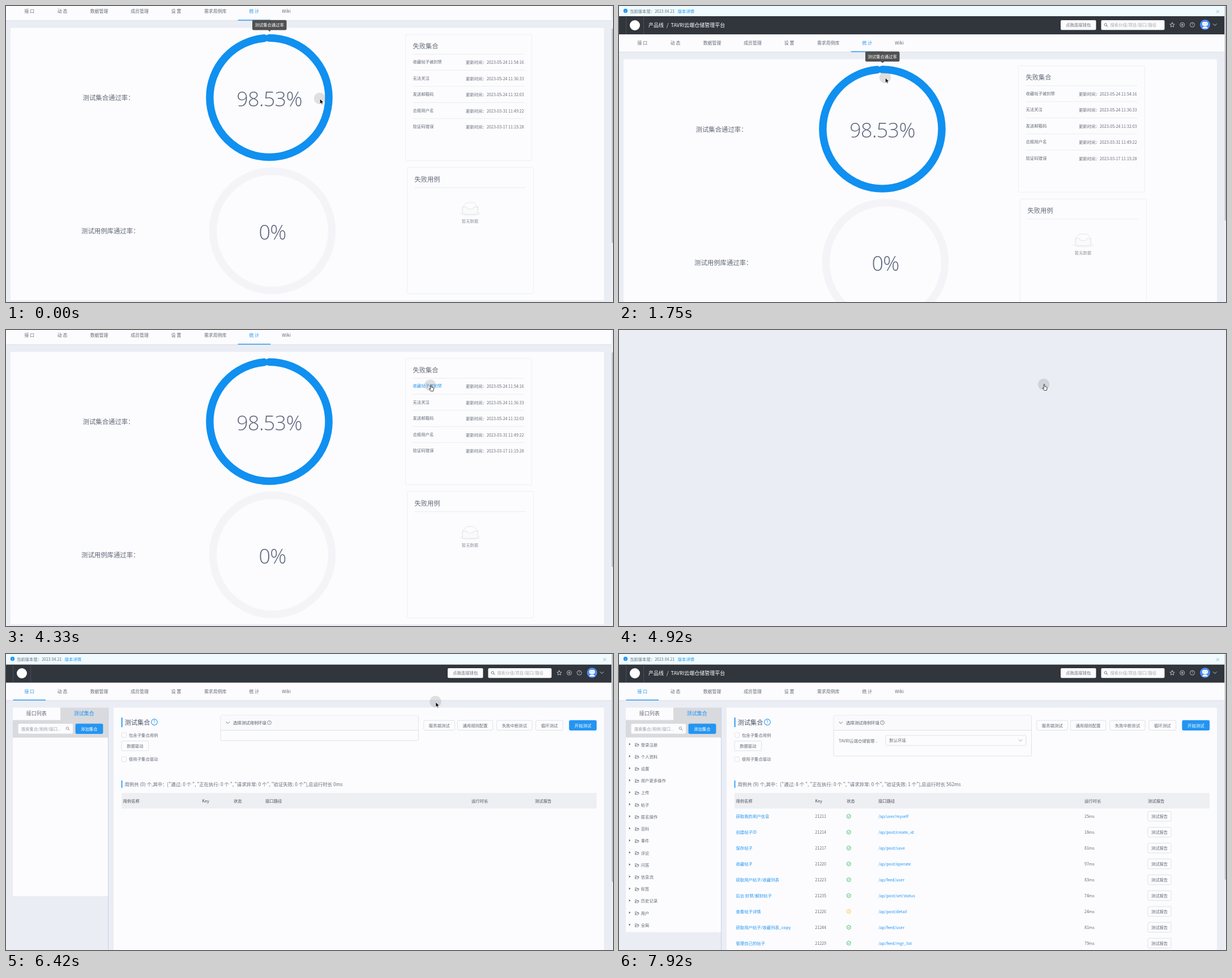
Write an HTML page that moves like this. It is 1072x522 px and loops after 9.16 s.

```html
<!DOCTYPE html>
<html lang="zh-CN">
<head>
<meta charset="utf-8">
<title>测试平台</title>
<style>
html, body { margin: 0; width: 100%; height: 100%; overflow: hidden; background: #ebedf5; }
svg { display: block; width: 1072px; height: 522px; }
text { font-family: "Noto Sans CJK SC", "Noto Sans CJK", "Noto Sans", sans-serif; white-space: pre; }
.big { font-family: "Open Sans", "Noto Sans", sans-serif; font-weight: 300; letter-spacing: -.7px; }
</style>
</head>
<body>
<svg id="stage" viewBox="0 0 1072 522" xmlns="http://www.w3.org/2000/svg"></svg>
<script>
const BLUE = '#2395f1', INK = '#646a79', PANEL = '#fcfcfe', PAGE = '#ebedf5', LINE = '#e3e5ec';
const LOOP = 9160, STEP = 1000 / 12, SCROLL = 55.5;
const PROJECT = 'TAVRI云端仓储管理平台';

// y is the vertical middle of the line
const text = (x, y, s, size = 7.35, fill = INK, anchor = 'start', more = '') =>
  `<text x="${x}" y="${(y + size * .37).toFixed(2)}" font-size="${size}" fill="${fill}" text-anchor="${anchor}" ${more}>${s}</text>`;
const mid = (x, y, s, size, fill, more) => text(x, y, s, size, fill, 'middle', more);
const rect = (x, y, x2, y2, fill, more = '') =>
  `<rect x="${x}" y="${y}" width="${x2 - x}" height="${y2 - y}" fill="${fill}" ${more}/>`;
const box = (x, y, x2, y2, fill = PANEL, stroke = '#d9dbe3') =>
  rect(x, y, x2, y2, fill, `rx="2" stroke="${stroke}" stroke-width=".8"`);
const path = (d, stroke, w = .8, fill = 'none') =>
  `<path d="${d}" fill="${fill}" stroke="${stroke}" stroke-width="${w}" stroke-linejoin="round" stroke-linecap="round"/>`;
const circle = (x, y, r, fill, more = '') => `<circle cx="${x}" cy="${y}" r="${r}" fill="${fill}" ${more}/>`;
const hline = (x, x2, y) => path(`M${x} ${y}H${x2}`, '#e6e8ee', .8);
const group = (id, body) => `<g id="${id}">${body}</g>`;
const button = (x, x2, y, s, primary) =>
  box(x, y, x2, y + 17.3, primary ? BLUE : PANEL, primary ? BLUE : undefined) +
  mid((x + x2) / 2, y + 8.7, s, 7.35, primary ? '#fff' : INK);
const chevron = (x, y, c) => path(`M${x - 3} ${y - 1.5}l3 3 3 -3`, c, .9);
const lens = (x, y, c) => circle(x - .6, y - .6, 2.2, 'none', `stroke="${c}" stroke-width=".8"`) + path(`M${x + 1} ${y + 1}l2 2`, c, .9);
const help = (x, y, r, c) => circle(x, y, r, 'none', `stroke="${c}" stroke-width="${r * .2}"`) + mid(x, y, '?', r * 1.5, c);

function star(x, y) {
  let d = '';
  for (let i = 0; i < 10; i++) {
    const a = i * Math.PI / 5, r = i % 2 ? 2 : 4.4;
    d += (i ? 'L' : 'M') + (x + r * Math.sin(a)).toFixed(2) + ' ' + (y - r * Math.cos(a)).toFixed(2);
  }
  return path(d + 'Z', '#d8dade', .8);
}

function header(dy, active, crumbId) {
  const tabs = [['接 口', 41.3], ['动 态', 99.5], ['数据管理', 164.5], ['成员管理', 236], ['设 置', 300.5],
    ['需求用例库', 369.7], ['统 计', 438.3], ['Wiki', 495]];
  const cx = tabs[active][1], top = 18 + dy, y = 34, icon = '#d8dade';
  return rect(0, 0, 1069.5, top, '#effbff') +
    circle(11.5, 8.5, 3.7, BLUE) + mid(11.5, 8.5, 'i', 5.5, '#fff') +
    text(19, 9, '当前版本是：') + text(63.2, 9, '2023.04.21', 7) + text(103.7, 9, '版本详情', 7.35, BLUE) +
    path('M1055.2 7.6l4.4 4.4m0 -4.4l-4.4 4.4', '#8d939c', .7) +
    rect(0, top, 1069.5, 50 + dy, '#31353c') +
    path(`M12.5 ${top}V${50 + dy}M43.5 ${top}V${50 + dy}`, '#50555c', .8) +
    circle(28, y, 9, '#fff') +
    group(crumbId, text(52, y, '产品线', 9, '#fff') + text(84, y, '/', 9, '#fff') + text(91.5, y, PROJECT, 9, '#fff')) +
    rect(780, 25, 842.5, 42.3, '#fcfcfe', 'rx="2"') + mid(811.2, 33.7, '点我连接钱包') +
    rect(851.5, 25, 963.5, 42.3, '#fcfcfe', 'rx="2"') + lens(860, 33.5, '#555b66') +
    text(867.5, 33.7, '搜索分组/项目/接口/路径', 7.3, '#a3a7b1') +
    star(977, 33.5) +
    circle(994.7, 33.2, 4, 'none', `stroke="${icon}" stroke-width=".8"`) + path('M992.7 33.2h4m-2 -2v4', icon, .8) +
    help(1012.5, 33.2, 4, icon) +
    circle(1035, 33, 9, '#4c8df5') + rect(1030, 28, 1040, 35, '#fff', 'rx="3.3"') +
    circle(1033, 31.5, .8, '#4c8df5') + circle(1037, 31.5, .8, '#4c8df5') +
    path('M1030.5 39.5a4.5 3.6 0 0 1 9 0z', '#fff', .3, '#fff') +
    chevron(1052.3, 33, icon) +
    rect(0, 80.5 + dy, 1069.5, 82 + dy, '#e0e2ea') + rect(0, 50 + dy, 1069.5, 80.7 + dy, PANEL) +
    tabs.map(([s, x], i) => mid(x, 65 + dy, s, 7.9, i == active ? BLUE : INK)).join('') +
    rect(cx - 28.8, 79.8 + dy, cx + 28.8, 81.2 + dy, BLUE);
}

function ring(x, y, share) {
  const r = 105.1, all = 2 * Math.PI * r;
  const arc = share ? circle(x, y, r, 'none', `stroke="#1090f0" stroke-width="13.4" stroke-linecap="round"
    stroke-dasharray="${all * share} ${all}" transform="rotate(-90 ${x} ${y})"`) : '';
  return circle(x, y, r, 'none', 'stroke="#f4f4f8" stroke-width="13.4"') + arc +
    mid(x, y + 2, share ? '98.53%' : '0%', 36, '#616a80', 'class="big"');
}

function statsPage() {
  const failed = [['收藏帖子被封禁', '05-24 11:54:16'], ['无法关注', '05-24 11:36:33'], ['发送邮箱码', '05-24 11:32:03'],
    ['合规用户名', '03-31 11:49:22'], ['验证码错误', '03-17 11:15:28']];
  const rows = failed.map(([s, d], i) => {
    const y = 154 + i * 28.5;
    return text(718.5, y, s, 7.35, INK, 'start', i ? '' : 'id="link"') + text(812, y + 1, '更新时间：') +
      text(914.7, y + 1, '2023-' + d, 7.1, INK, 'end') + (i < 4 ? hline(719, 915, y + 14.7) : '');
  }).join('');
  const empty = `<g transform="translate(801 402.3) scale(.587)" fill="none" stroke="#d9dbe0" stroke-width="1.2">
    <ellipse cx="32" cy="33" rx="32" ry="7" fill="#f5f5f8" stroke="none"/>
    <path d="M55 12.8L44.9 1.3Q44 0 42.9 0H21.1Q20 0 19.1 1.3L9 12.8V22H55Z"/>
    <path fill="#fafafc" d="M41.6 15.9Q42 13 43.8 13H55V31Q55 35 52 35H12Q9 35 9 31V13H20.2Q22 13 22.4 16T24.6 18.9H39.4Q41.3 18.9 41.6 15.9Z"/></g>`;
  return rect(0, 0, 1072, 600, PAGE) + header(0, 6, 'crumbA') +
    rect(8, 94, 1056, 574.5, PANEL) +
    text(135.5, 217.3, '测试集合通过率：', 11.4) + text(133, 452.3, '测试用例库通过率：', 11.4) +
    ring(465, 217, .9853) + ring(470.5, 452, 0) +
    box(705.5, 105.5, 928.5, 328.3, PANEL, '#e9ebf3') + text(718.5, 126, '失败集合', 11.25) + hline(719, 915, 140.6) + rows +
    box(708.5, 340.3, 931.5, 563, PANEL, '#e9ebf3') + text(721.5, 361, '失败用例', 11.25) + hline(722, 917, 375.8) +
    empty + mid(819.5, 435.2, '暂无数据', 7.35, '#8f94a0') +
    group('tip', rect(435, 80.2, 495.5, 98, '#505050', 'rx="2.2"') + path('M462.4 98l3 2.6 3 -2.6z', 'none', 0, '#505050') +
      mid(465.2, 89.2, '测试集合通过率', 7.35, '#fff'));
}

const summary = (n, ok, bad, ms) => text(209.5, 229.7,
  `用例共 (${n}) 个,其中：["通过: ${ok} 个 ", "正在执行: 0 个 ", "请求异常: 0 个", "验证失败: ${bad} 个"],总运行时长 ${ms}ms`, 8.38);

function casePage() {
  const folders = ['登录注册', '个人资料', '设置', '用户更多操作', '上传', '帖子', '匿名操作', '百科', '事件', '评论', '问答',
    '信息流', '标签', '历史记录', '用户', '全局'];
  const tree = folders.map((s, i) => {
    const y = 159.8 + i * 21.22;
    return path(`M17.8 ${y - 2.8}l2.4 2 -2.4 2z`, 'none', 0, '#4d5360') +
      path(`M28.8 ${y + 2.6}v-5h2.4l1 1.2h2v1.3m-5.4 2.5l1.3 -2.5h5.2l-1.3 2.5z`, '#5d6373', .7) + text(38.7, y, s);
  }).join('');
  const cases = [['获取我的用户信息', 21211, 'user/myself', 25], ['创建帖子ID', 21214, 'post/create_id', 18],
    ['保存帖子', 21217, 'post/save', 81], ['收藏帖子', 21220, 'post/operate', 97], ['获取用户帖子/收藏列表', 21223, 'feed/user', 83],
    ['后台 封禁/解封帖子', 21235, 'post/set/status', 74], ['查看帖子详情', 21226, 'post/detail', 24],
    ['获取用户帖子/收藏列表_copy', 21244, 'feed/user', 81], ['管理自己的帖子', 21229, 'feed/mgr_list', 79]];
  const rows = cases.map(([s, key, url, ms], i) => {
    const y = 286.6 + i * 27.95, warn = i == 6, c = warn ? '#f5c02c' : '#2fbf62';
    return text(206.5, y, s, 7.35, BLUE) + text(346.3, y, key, 7.1) +
      circle(405.8, y - .3, 3.5, 'none', `stroke="${c}" stroke-width=".9"`) +
      path(warn ? `M405.8 ${y - 1.8}v1.8m0 1.2v.1` : `M404.2 ${y - .3}l1.2 1.2 2.1 -2.3`, c, .9) +
      text(458.2, y, '/ap/' + url, 7.2, BLUE) + text(822, y, ms + 'ms', 7.1) + button(934, 975, y - 9, '测试报告');
  }).join('');
  const heads = [['用例名称', 206.5], ['Key', 346.3], ['状态', 402], ['接口路径', 458], ['运行时长', 822], ['测试报告', 934]];
  const check = (y, s) => box(204.2, y - 4.3, 212.6, y + 4.1) + text(217, y, s);
  return rect(0, 0, 1072, 522, PAGE) + header(.7, 0, 'crumbB') +
    rect(12, 94.5, 180, 427, PANEL) + path('M180.6 94.5V522', '#c8d0ea', 1) +
    rect(96, 94.5, 180, 117, '#d9dade') + rect(12, 116.5, 180, 147.5, '#d9dade') +
    mid(53.7, 105, '接口列表', 9) + mid(137.7, 105, '测试集合', 9, BLUE) +
    rect(21.5, 123, 118, 140.5, PANEL, 'rx="2"') + text(27, 132, '搜索集合/用例/接口...', 7.3, '#9a9eaa') + lens(109, 131.5, '#7b808c') +
    button(123, 171, 123.2, '添加集合', true) +
    group('tree', rect(12, 147.5, 180, 490.5, PANEL) + tree) +
    rect(190, 94.5, 1056, 522, PANEL) +
    rect(203.7, 112, 205.6, 129, BLUE) + text(209.5, 120.5, '测试集合', 11.25, '#4f5667') + help(262, 120.2, 5.3, BLUE) +
    check(143, '包含子集合用例') + button(204, 251.7, 153.4, '数据驱动') + check(185.7, '使用子集合驱动') +
    group('envShort', box(379, 108, 728.5, 152.7)) +
    group('envFull', box(379, 108, 728.5, 180) + text(388, 152.8, PROJECT.slice(0, 11) + '...', 7.3) +
      box(470.8, 143.7, 719, 161.3) + text(477.2, 152.6, '默认环境') + chevron(709, 152.5, '#a4a8b2')) +
    rect(379.4, 108.4, 728.1, 134.3, '#fafafc') + path('M379 134.5H728.5', '#d9dbe3') +
    chevron(391.7, 121.2, '#5d6373') + text(401, 121.3, '选择测试用例环境', 7.35, '#4f5667') + help(465, 121, 3.5, '#5d6373') +
    button(737.8, 792.5, 117.1, '服务端测试') + button(797.3, 859.7, 117.1, '通用规则配置') +
    button(866.7, 929.2, 117.1, '失败中断测试') + button(935.7, 983.7, 117.1, '循环测试') + button(994.8, 1042.8, 117.1, '开始测试', true) +
    rect(203.7, 223, 205.4, 236, BLUE) +
    group('sumEmpty', summary(0, 0, 0, 0)) + group('sumFull', summary(9, 8, 1, 562)) +
    rect(204, 245, 1043, 272.5, '#eeeff2') +
    heads.map(([s, x]) => text(x, 259, s, 7.35, '#4b515f', 'start', 'font-weight="500"')).join('') +
    group('rows', rows);
}

function loader() {
  let dots = '';
  for (let i = 0; i < 8; i++) {
    const a = i * Math.PI / 4;
    dots += circle(541.3 + 14 * Math.sin(a), 266.4 - 14 * Math.cos(a), 3, BLUE, 'class="dot"');
  }
  return rect(0, 0, 1072, 522, '#fbfdff') + dots;
}

const pointer = circle(0, 0, 10.2, '#888', 'opacity=".25"') +
  group('arrow', path('M.6 1.2V9.3L2.5 7.6 3.9 10.6 5.2 10 3.9 7.1H6.4Z', '#fff', .5, '#000')) +
  group('hand', path('M.2 0Q1 -1 1.8 0V3.6L5.4 4.5Q6.3 4.9 6.1 6L5.2 10.5H.9L-1.9 6.8Q-2 5.5 -.8 5.9L.2 7Z', '#333', .9, '#fff'));

document.getElementById('stage').innerHTML =
  group('stats', statsPage()) + group('blank', rect(0, 0, 1072, 522, PAGE)) + group('load', loader()) +
  group('cases', casePage()) +
  group('bar', rect(1069.5, 0, 1072, 522, '#eff0f4') + rect(1069.8, 0, 1072, 378, '#bfc1c7', 'id="thumb" rx="1"')) +
  group('pointer', pointer);

const $ = id => document.getElementById(id);
const show = (id, on) => $(id).setAttribute('visibility', on ? 'inherit' : 'hidden');
const clamp = v => Math.max(0, Math.min(1, v));
const ramp = (t, a, b) => clamp((t - a) / (b - a));
const ease = v => v * v * (3 - 2 * v);
const dots = [...document.querySelectorAll('.dot')];

// time, x, y
const route = [[0, 554, 163], [250, 660, 177], [420, 810, 168], [917, 469, 122], [1333, 469, 122], [1417, 469, 123],
  [1500, 469, 123], [1750, 470, 126], [2417, 470, 141], [3000, 747, 107], [3084, 747, 107], [3417, 748, 133], [4083, 749, 98],
  [4750, 750, 96], [5000, 750, 96], [5417, 775, 80], [5584, 775, 80], [6083, 757, 88], [6417, 758.5, 84], [7084, 758.5, 84],
  [7834, 987, 11], [LOOP, 987, 11]];

function place(t) {
  const i = Math.max(1, route.findIndex(k => k[0] >= t));
  const [a, b] = [route[i - 1], route[i]], k = ease(ramp(t, a[0], b[0]));
  return [a[1] + (b[1] - a[1]) * k, a[2] + (b[2] - a[2]) * k];
}

function draw(ms) {
  const n = Math.floor((ms + 5) / STEP), t = n * STEP + 1;
  const [x, y] = place(t - 1);
  const scene = t < 4916 ? 'stats' : t < 5666 ? 'blank' : t < 6333 ? 'load' : 'cases';
  for (const id of ['stats', 'blank', 'load', 'cases']) show(id, id == scene);

  const scroll = scene == 'stats' ? SCROLL * (1 - ease(ramp(t, 917, 1250)) + ease(ramp(t, 1834, 2250))) : 0;
  $('stats').setAttribute('transform', `translate(0 ${-scroll})`);
  $('tip').setAttribute('opacity', 1 - ramp(t, 200, 360) + ramp(t, 760, 917) - ramp(t, 2640, 2830));
  const hover = scene == 'stats' && t > 3500 && x > 718 && x < 770 && y < 103;
  $('link').setAttribute('fill', hover ? BLUE : INK);

  dots.forEach((dot, i) => {
    const gap = Math.abs((((i - 4 - (n - 73)) % 8) + 12) % 8 - 4);
    dot.setAttribute('r', 4.3 - gap * .62);
    dot.setAttribute('opacity', 1 - gap * .15);
  });

  const named = t > 6666, filled = t > 6833, env = t > 6916;
  show('crumbB', named);
  show('tree', named);
  show('rows', filled);
  show('sumFull', filled);
  show('sumEmpty', !filled);
  show('envFull', env);
  show('envShort', !env);

  show('bar', scene == 'stats' || scene == 'cases');
  $('thumb').setAttribute('y', scroll * .71);
  $('thumb').setAttribute('height', scene == 'stats' ? 378.5 : filled ? 398 : 402);

  const hand = hover || scene == 'blank';
  show('arrow', !hand);
  show('hand', hand);
  show('pointer', t < 7916);
  $('pointer').setAttribute('transform', `translate(${x.toFixed(2)} ${y.toFixed(2)})`);
}

const start = performance.now();
function frame() {
  draw((performance.now() - start) % LOOP);
  requestAnimationFrame(frame);
}
frame();
</script>
</body>
</html>
```
